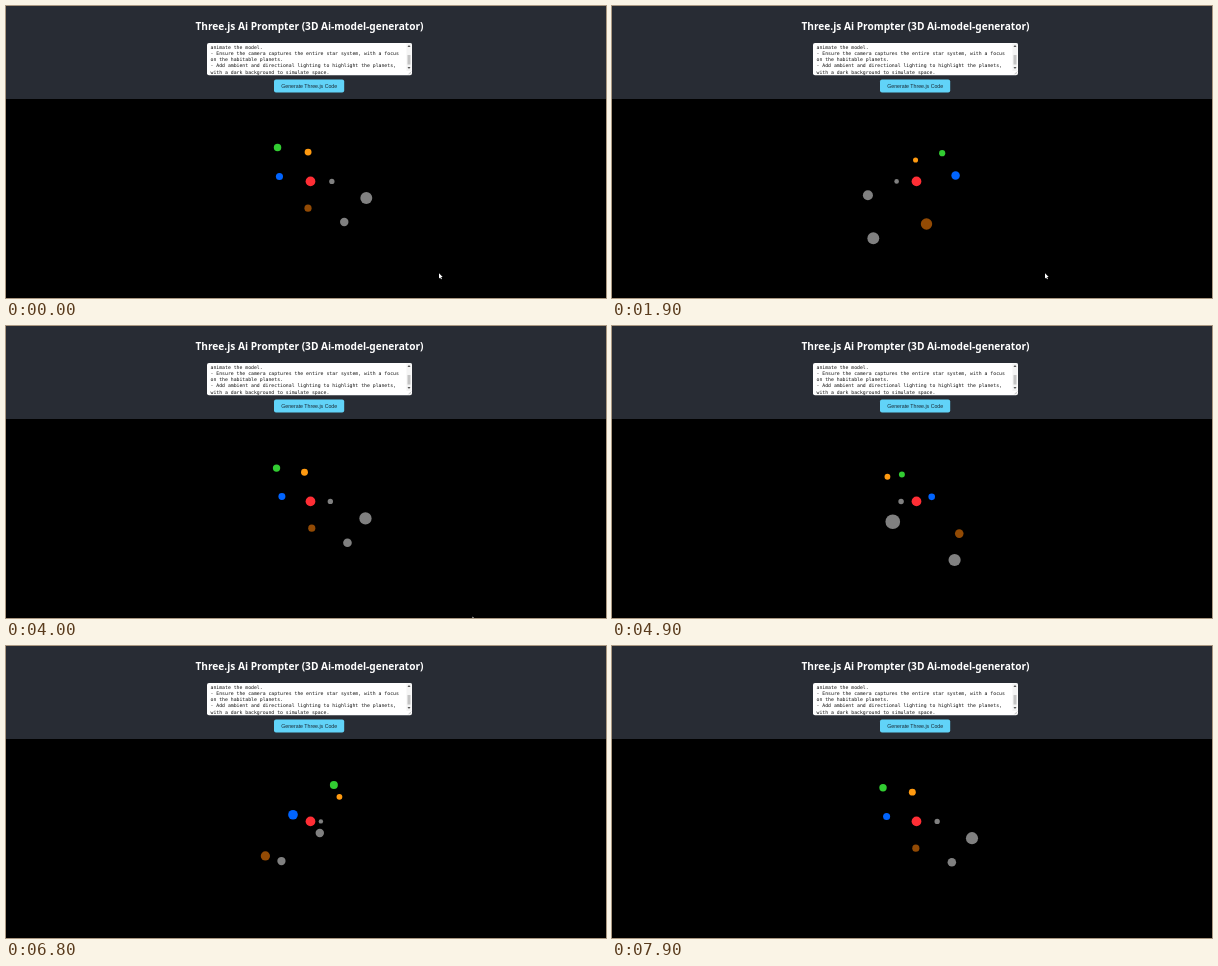
Recreate the animation shown at these times as an HTML page with a canvas. Size 600 by 292 pixels, loop 8 s.

```html
<!DOCTYPE html>
<html lang="en">
<head>
<meta charset="utf-8">
<title>Star system</title>
<style>
  html, body { margin: 0; width: 100%; height: 100%; overflow: hidden; background: #000; }
  canvas, svg { position: absolute; left: 0; top: 0; display: block; }
  .title { font: 700 10.15px "Noto Sans", "Open Sans", sans-serif; fill: #fff; }
  .prompt { font: 4.82px "DejaVu Sans Mono", monospace; fill: #111; }
  .button { font: 5.22px "Liberation Sans", Arial, sans-serif; fill: #1b2a35; }
</style>
</head>
<body>
<canvas id="stage" width="600" height="292"></canvas>
<svg width="600" height="93" viewBox="0 0 600 93">
  <rect width="600" height="93" fill="#282c34"/>
  <text class="title" x="303.5" y="23.6" text-anchor="middle">Three.js Ai Prompter (3D Ai-model-generator)</text>

  <rect x="201" y="37" width="205" height="32.3" rx="2" fill="#fff"/>
  <g class="prompt">
    <text x="204.5" y="42.6">animate the model.</text>
    <text x="204.5" y="48.9">- Ensure the camera captures the entire star system, with a focus</text>
    <text x="204.5" y="55.1">on the habitable planets.</text>
    <text x="204.5" y="61.4">- Add ambient and directional lighting to highlight the planets,</text>
    <text x="204.5" y="67.6">with a dark background to simulate space.</text>
  </g>
  <rect x="400.5" y="37.5" width="5" height="27.5" fill="#f4f4f4"/>
  <rect x="401.5" y="49" width="3" height="9.5" fill="#c4c4c4"/>
  <path d="M401.5 41 L403 39 L404.5 41Z M401.5 61 L403 63 L404.5 61Z" fill="#555"/>
  <path d="M402.5 68.3 L405.3 65.5 M404.2 68.3 L405.3 67.2" stroke="#888" stroke-width=".5"/>

  <rect x="268" y="73.6" width="70.2" height="12.8" rx="2" fill="#61d3f8"/>
  <text class="button" x="303.2" y="81.9" text-anchor="middle">Generate Three.js Code</text>
</svg>
<script>
const ctx = document.getElementById('stage').getContext('2d');
const LOOP = 8000, STEP = 100, PERIOD = 3934;
const CENTER = { x: 304.5, y: 175.4 };
const CAMERA = 190;   // camera distance, in pixels at the star's depth
const UNIT = 4.88;    // pixels per world unit at the star's depth

// Orbit radius, height (down is positive) and starting angle in degrees; 0 faces the camera.
const bodies = [
  { orbit: 0, size: 1, height: 0, angle: 0, color: '#ff2e35' },
  { orbit: 5, height: 0, angle: 54, color: '#808080' },
  { orbit: 6, height: -5.08, angle: -4, color: '#ff9a10' },
  { orbit: 7, height: -6.37, angle: -62, color: '#32cd32' },
  { orbit: 8, height: -1.1, angle: -119, color: '#0064ff' },
  { orbit: 9, height: 6.75, angle: -176, color: '#924a04' },
  { orbit: 10, height: 9.6, angle: 127, color: '#808080' },
  { orbit: 11, height: 3.05, angle: 69.5, color: '#808080' },
];

// Pointer path as [time, x, y]
const pointerPath = [
  [0, 433, 267.3], [2500, 433, 267.3], [2900, 438, 266.3],
  [3300, 439.5, 267.5], [4000, 466.5, 290.5],
];

function project(body, time) {
  const angle = body.angle * Math.PI / 180 - 2 * Math.PI * time / PERIOD;
  const orbit = body.orbit * UNIT;
  const depth = orbit * Math.cos(angle);
  const scale = CAMERA / (CAMERA - depth);
  return {
    depth,
    x: CENTER.x + orbit * Math.sin(angle) * scale,
    y: CENTER.y + body.height * UNIT * scale,
    radius: (body.size || body.orbit / 10) * UNIT * scale,
    color: body.color,
  };
}

function drawBody({ x, y, radius, color }) {
  ctx.fillStyle = color;
  ctx.beginPath();
  ctx.arc(x, y, radius, 0, 2 * Math.PI);
  ctx.fill();
}

function drawPointer(time) {
  const next = pointerPath.findIndex(([at]) => at > time);
  const last = pointerPath[pointerPath.length - 1];
  if (next < 0 && time > last[0]) return;
  const [t1, x1, y1] = next < 0 ? last : pointerPath[next];
  const [t0, x0, y0] = next < 0 ? last : pointerPath[next - 1];
  const part = t1 > t0 ? (time - t0) / (t1 - t0) : 0;
  ctx.save();
  ctx.translate(x0 + (x1 - x0) * part, y0 + (y1 - y0) * part);
  ctx.fillStyle = '#fff';
  ctx.fill(new Path2D('M0 0 L0 5.2 L1.2 4.1 L2 6 L2.9 5.6 L2.1 3.8 L3.7 3.7Z'));
  ctx.restore();
}

function draw(time) {
  const stalled = time >= 400 && time < 700;
  const sceneTime = stalled ? 400 : time;
  ctx.fillStyle = '#000';
  ctx.fillRect(0, 0, 600, 292);
  bodies.map(body => project(body, sceneTime))
    .sort((a, b) => a.depth - b.depth)
    .forEach(drawBody);
  drawPointer(time);
}

const start = performance.now();
function tick() {
  const time = (performance.now() - start) % LOOP;
  draw(Math.floor(time / STEP) * STEP);
  requestAnimationFrame(tick);
}
tick();
</script>
</body>
</html>
```
